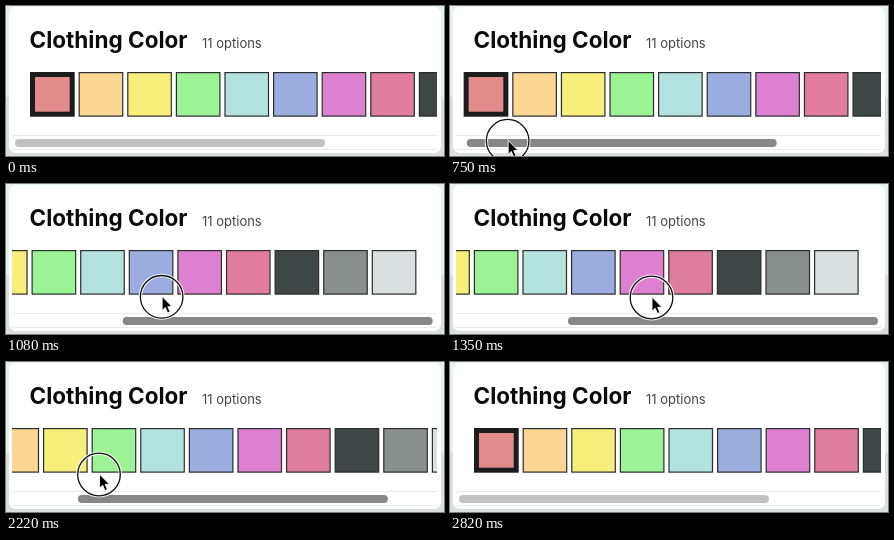
Write an HTML page that moves like this. It is 438 by 150 pixels and loops after 3480 ms.

```html
<!DOCTYPE html>
<html lang="en">
<head>
<meta charset="utf-8">
<title>Clothing Color</title>
<style>
  html, body { margin: 0; width: 100%; height: 100%; overflow: hidden; }
  svg { display: block; width: 438px; height: 150px; }
  text { font-family: Inter, "Open Sans", sans-serif; }
</style>
</head>
<body>
<svg viewBox="0 0 438 150">
  <defs><clipPath id="viewport"><rect x="6" y="60" width="425" height="60"/></clipPath></defs>
  <rect width="438" height="150" fill="#e5f1ef"/>
  <rect y="91" width="438" height="59" fill="#d9dfde"/>
  <rect x="3" y="1" width="432" height="146" rx="7" fill="#fff"/>
  <text x="23.5" y="42" font-size="22.5" font-weight="700" fill="#0b0b0b">Clothing Color</text>
  <text x="196" y="42" font-size="13" fill="#444">11 options</text>
  <g clip-path="url(#viewport)"><g id="swatches"></g></g>
  <path d="M6 129.5H431M6 143.5H431" stroke="#ebebeb"/>
  <rect id="thumb" y="133" width="310" height="8" rx="4"/>
  <g id="cursor">
    <g fill="none">
      <circle r="21.3" stroke="#fff" stroke-width="3.4" opacity=".85"/>
      <circle r="21.3" stroke="#111" stroke-width="1.3"/>
    </g>
    <path transform="translate(.5 .5) scale(.88)" stroke="#fff"
      d="M0 -1V15L3.6 11.6L6.2 17.6L9 16.4L6.4 10.6H11.3Z"/>
  </g>
</svg>
<script>
const LOOP = 3480, STEP = 30;
const PITCH = 48.6, MAX_SCROLL = 146, THUMB_TRAVEL = 109;
const HOVER = 540, GRAB = 640, RELEASE = 2820, GRAB_X = 39.2, DRAG_LAG = 36;

const colors = ['#e18b8b', '#fbd793', '#f8ee7b', '#9cf396', '#b4e2de', '#9badde',
  '#dd80d0', '#e07c9e', '#3e4646', '#8a908e', '#dae0df'];

// Pointer key points: time, x, y
const path = [
  [0, 384, 176], [240, 295, 58], [600, 43.5, 140.5], [930, 120.5, 115.5],
  [1350, 201.5, 113.5], [1920, 164.5, 111.5], [2220, 93, 112.5], [2700, -23, 112]
];

const $ = id => document.getElementById(id);
const clamp = (v, lo, hi) => Math.min(hi, Math.max(lo, v));

$('swatches').innerHTML = colors.map((color, i) => {
  const selected = i === 0, border = selected ? 5 : 1.2, size = 44.7 - border;
  return `<rect x="${24 + i * PITCH + border / 2}" y="${66 + border / 2}" width="${size}" height="${size}"
    fill="${color}" stroke="${selected ? '#1c1c1e' : '#2a2d2d'}" stroke-width="${border}"/>`;
}).join('');

// Smooth cubic Hermite curve through the key points
function pointer(t) {
  const last = path.length - 1;
  if (t >= path[last][0]) return path[last].slice(1);
  const i = path.findIndex(p => p[0] > t) - 1;
  const a = path[i], b = path[i + 1], span = b[0] - a[0], u = (t - a[0]) / span;
  const slope = (k, axis) => {
    const p = path[Math.max(0, k - 1)], n = path[Math.min(last, k + 1)];
    return (n[axis] - p[axis]) / (n[0] - p[0]);
  };
  return [1, 2].map(axis =>
    a[axis] * (1 + 2 * u) * (1 - u) ** 2 + b[axis] * u * u * (3 - 2 * u) +
    span * (slope(i, axis) * u * (1 - u) ** 2 - slope(i + 1, axis) * u * u * (1 - u)));
}

function draw(now) {
  const t = Math.floor(now % LOOP / STEP) * STEP;
  const [x, y] = pointer(t);
  const [dragX] = pointer(Math.max(t - DRAG_LAG, GRAB));
  const offset = clamp(dragX - GRAB_X, 0, THUMB_TRAVEL);
  $('cursor').setAttribute('transform', `translate(${x} ${y})`);
  $('swatches').setAttribute('transform', `translate(${-offset / THUMB_TRAVEL * MAX_SCROLL} 0)`);
  $('thumb').setAttribute('x', 9 + offset);
  $('thumb').setAttribute('fill', t >= HOVER && t < RELEASE ? '#878787' : '#c1c1c1');
}

const start = performance.now();
function tick() {
  draw(performance.now() - start);
  requestAnimationFrame(tick);
}
tick();
</script>
</body>
</html>
```
